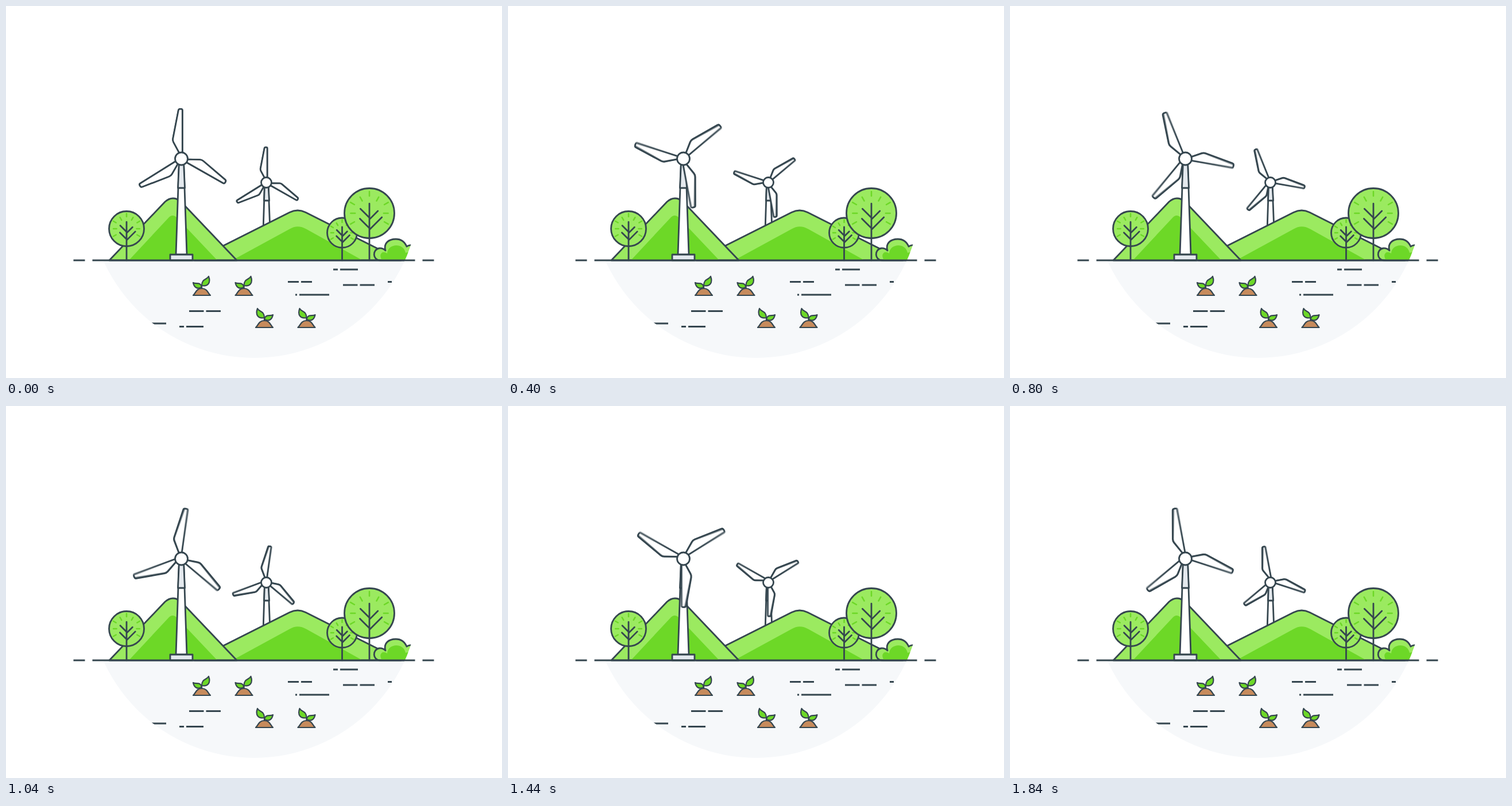
Recreate the animation shown at these times as an HTML page. Size 864 by 648 pixels, loop 1920 ms.

```html
<!DOCTYPE html>
<html lang="en">
<head>
<meta charset="utf-8">
<title>Wind turbines</title>
<style>
  html, body { margin: 0; width: 100%; height: 100%; overflow: hidden; background: #fff; }
  svg { display: block; width: 100vw; height: 100vh; }
  .ink { stroke: #35464f; stroke-width: 2.8; stroke-linecap: round; stroke-linejoin: round; }
  .thin { stroke-width: 2.2; }
  .butt { stroke-linecap: butt; }
  .light { fill: #9bea60; }
  .dark { fill: #6dd827; }
  .tick { stroke: #6dd827; stroke-width: 2.5; stroke-linecap: round; }
  .white { fill: #fff; }
  .grey { fill: #e4e9ee; }
  .none { fill: none; }
</style>
</head>
<body>
<svg viewBox="0 0 864 648">
  <defs>
    <clipPath id="disc"><circle cx="432" cy="325" r="288"/></clipPath>
    <clipPath id="soil"><rect y="443" width="864" height="205"/></clipPath>
    <path id="blade" class="ink white" vector-effect="non-scaling-stroke"
      d="M1.5-8V-84Q1.5-86.5-1-86.5H-2.8Q-5-86.5-5.5-84L-15-35Q-15.6-31.5-14-28.5L-3-8Z"/>
    <g id="rotor">
      <use href="#blade"/>
      <use href="#blade" transform="rotate(119.5)"/>
      <use href="#blade" transform="rotate(238)"/>
    </g>
    <g id="sprout">
      <path class="ink thin none" d="M0-11V-18"/>
      <path class="ink thin dark" d="M0-17C0-29 9-27 12-33C16-22 11-15 0-17Z"/>
      <path class="ink thin dark" d="M0-15C-3-24-9-19-15-22C-13-12-5-10 0-15Z"/>
      <path class="ink thin" fill="#c78b5c" d="M-15 0C-11-3-10-12 0-12C10-12 11-3 15 0Z"/>
    </g>
  </defs>

  <rect width="864" height="648" fill="#fff"/>
  <g clip-path="url(#soil)"><circle cx="432" cy="325" r="288" fill="#f6f8fa"/></g>

  <!-- small tower -->
  <path class="ink white" d="M450.5 312L448 392H460L457 312Z"/>
  <path class="ink grey" d="M450.5 312L449.5 339H458.5L457 312Z"/>

  <!-- hills -->
  <path class="ink light" d="M328 443L494 359.500Q508 352.500 522 359.500L688 443Z"/>
  <path class="dark" d="M394 443L494 388.500Q508 380 523 388.500L621 443Z"/>
  <path class="ink light" d="M180 443L277 341Q290 329.500 304 340L402 443Z"/>
  <path class="dark" d="M214 443L283 369Q290 361 298 369L368 443Z"/>

  <!-- big tower -->
  <path class="ink white" d="M301.500 272L296 433H315L309.500 272Z"/>
  <path class="ink grey" d="M301.500 272L299.500 317H311.500L309.500 272Z"/>
  <rect class="ink grey" x="286" y="433" width="39" height="10"/>

  <!-- bush -->
  <g clip-path="url(#disc)">
    <path class="ink light" d="M652 443C638 443 638 424 650 422Q656 421 661 426C657 413 667 406 679 406C689 406 695 412 698 419Q703 415 716 417V443Z"/>
    <path class="dark" d="M655 443Q649 433 656 429Q660 428 664 431C665 413 693 412 696 430Q702 427 716 430V443Z"/>
  </g>
  <g id="trees"></g>
  <path class="ink none" style="stroke-linecap:butt" stroke-dasharray="20 13 562 13 20" d="M117.500 443H745.500"/>
  <g id="furrows" clip-path="url(#disc)"></g>
  <g id="sprouts"></g>
  <g id="rotors"></g>
  <circle class="ink white" cx="453.500" cy="307.500" r="9"/>
  <circle class="ink white" cx="305.500" cy="266" r="11"/>
</svg>
<script>
const LOOP = 1920, STEP = 80, TURN = 10, BLUR = 0.7;
const GROUND = 443;

function add(parent, tag, attrs) {
  const el = document.createElementNS('http://www.w3.org/2000/svg', tag);
  for (const key in attrs) el.setAttribute(key, attrs[key]);
  return parent.appendChild(el);
}
const addTo = (id, tag, attrs) => add(document.getElementById(id), tag, attrs);

function tree(cx, cy, r) {
  const g = addTo('trees', 'g', { transform: `translate(${cx} ${cy})` });
  add(g, 'circle', { r, class: 'ink light' });

  // Leaves point outward on two alternating rings.
  let leaves = '';
  for (let i = -4; i <= 4; i++) {
    const angle = i * Math.PI / 6;
    const mid = r * (i % 2 ? 0.66 : 0.78);
    const at = d => `${Math.sin(angle) * d} ${-Math.cos(angle) * d}`;
    leaves += `M${at(mid - r * 0.09)}L${at(mid + r * 0.09)}`;
  }
  add(g, 'path', { d: leaves, class: 'tick' });

  // Branches leave the trunk at 45 degrees.
  const branch = (reach, root) => `M0 ${root * r}l${reach * r} ${-Math.abs(reach) * r}`;
  add(g, 'path', {
    d: `M0 ${-0.39 * r}V${GROUND - cy}` +
      branch(-0.36, 0.18) + branch(0.34, 0.25) + branch(-0.38, 0.6) + branch(0.5, 0.66),
    class: 'ink none'
  });
}

tree(210, 388, 30.5);
tree(585.5, 395, 26);
tree(633, 361, 43.5);

// A furrow is a line broken by one small gap.
function furrow(x, y, length, first = length / 2 - 2) {
  addTo('furrows', 'path', {
    d: `M${x} ${y}h${first}m4 0H${x + length}`, class: 'ink butt none'
  });
}
furrow(570, 459, 43, 8);
furrow(491, 480.5, 42);
furrow(665, 480.5, 18);
furrow(587, 486, 55);
furrow(504, 503, 59, 3);
furrow(319, 531.5, 55);
furrow(225, 553, 54);
furrow(302, 558.5, 42, 8);

for (let i = 0; i < 4; i++) {
  const row = i >> 1;
  const x = 341 + 109 * row + 73.5 * (i % 2);
  addTo('sprouts', 'use', {
    href: '#sprout',
    transform: `translate(${x} ${504 + 56 * row}) scale(${1 - 2 * row} 1)`
  });
}

// Each rotor turns about a pivot slightly off its own centre;
// averaged copies soften the moving tips.
function rotor(x, y, dx, dy, scale) {
  const copies = [1, 1 / 2, 1 / 3].map(opacity =>
    addTo('rotors', 'use', { href: '#rotor', opacity }));
  return step => copies.forEach((copy, i) => {
    const angle = step * TURN + (step ? (i - 1) * BLUR : 0);
    copy.setAttribute('transform',
      `rotate(${angle} ${x + dx} ${y + dy}) translate(${x} ${y}) scale(${scale})`);
  });
}
const rotors = [
  rotor(454, 307.6, -0.2, -1.4, 0.71),
  rotor(305.8, 265.8, -1, -1, 1)
];

function tick() {
  const step = Math.floor((performance.now() % LOOP) / STEP);
  for (const turn of rotors) turn(step);
  requestAnimationFrame(tick);
}
tick();
</script>
</body>
</html>
```
